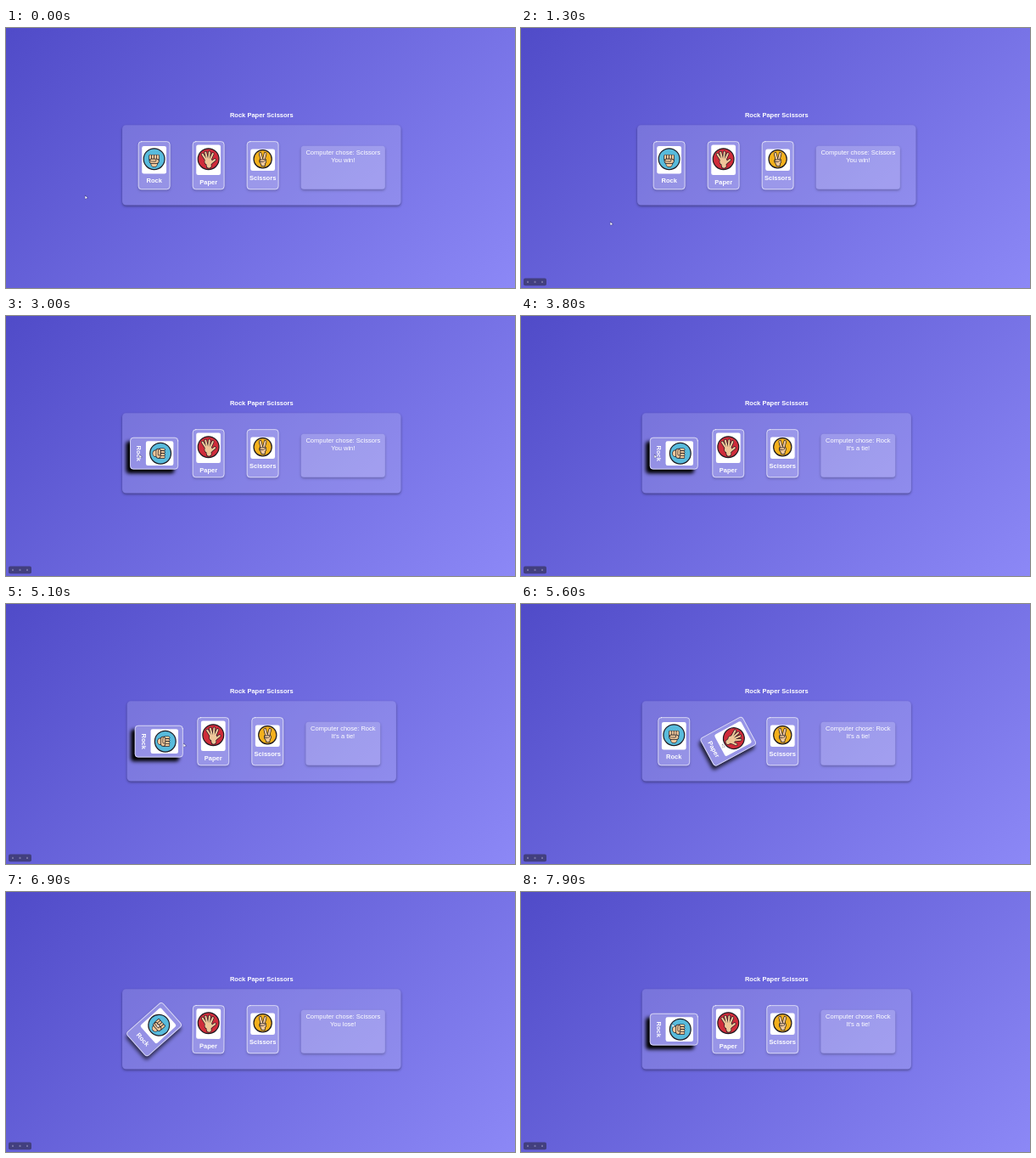
An HTML page with a canvas for the animation above (8000 ms loop, 600 by 306 pixels).

```html
<!DOCTYPE html>
<html lang="en">
<head>
<meta charset="utf-8">
<title>Rock Paper Scissors</title>
<style>
  html, body { margin: 0; width: 100%; height: 100%; overflow: hidden; background: #6d69de; }
  canvas { display: block; width: 100vw; height: 100vh; }
</style>
</head>
<body>
<canvas id="stage"></canvas>
<script>
const W = 600, H = 306, LOOP = 8000, TURN = 500, GLIDE = 400;
const canvas = document.getElementById('stage');
const ctx = canvas.getContext('2d');
const dpr = window.devicePixelRatio || 1;
canvas.width = W * dpr;
canvas.height = H * dpr;

const FONT = '7.53px "Liberation Sans", Arial, sans-serif';
const INK = '#1d1a22', SKIN = '#efc79a';
const CENTER = 301.3, PAD = 18.7, GAP = 26.2;
const CARD_W = 37.8, CARD_H = 57, CARD_Y = 161.7;

const cards = [
  { name: 'Rock', imgH: 32.5, color: '#58bbdc', hand: fist, hover: [[2035, 5120], [6745, LOOP + TURN]] },
  { name: 'Paper', imgH: 35.5, color: '#cf2c3a', hand: palm, hover: [[5400, 6450]] },
  { name: 'Scissors', imgH: 25.5, color: '#f3b01c', hand: victory, hover: [] }
];

// Each round: the player's and the computer's card by index
const rounds = [
  { at: 0, you: 0, computer: 2 },
  { at: 3400, you: 0, computer: 0 },
  { at: 6100, you: 1, computer: 2 },
  { at: 7300, you: 0, computer: 0 }
];
const verdicts = ["It's a tie!", 'You win!', 'You lose!'];

// Where the pointer comes to rest
const stops = [
  { at: 0, x: 94, y: 198 },
  { at: 400, x: 91, y: 220 },
  { at: 1000, x: 106, y: 229 },
  { at: 2300, x: 158, y: 164 },
  { at: 5100, x: 210, y: 165 },
  { at: 5500, x: 238, y: 166 },
  { at: 6900, x: 179, y: 156 }
];

const clamp = p => Math.min(1, Math.max(0, p));
const smooth = p => p * p * (3 - 2 * p);

// CSS "ease": solve the Bezier's x for its parameter, then take y
function ease(p) {
  if (p <= 0 || p >= 1) return clamp(p);
  const bez = (a, b, u) => 3 * a * u * (1 - u) ** 2 + 3 * b * u * u * (1 - u) + u ** 3;
  let lo = 0, hi = 1;
  for (let i = 0; i < 24; i++) {
    const mid = (lo + hi) / 2;
    if (bez(0.25, 0.25, mid) < p) lo = mid; else hi = mid;
  }
  return bez(0.1, 1, lo);
}

function turnOf(card, t) {
  return card.hover.reduce((sum, [enter, leave]) =>
    sum + ease((t - enter) / TURN) - ease((t - leave) / TURN), 0);
}

function cursorAt(t) {
  let { x, y } = stops[0];
  for (const stop of stops.slice(1)) {
    const k = smooth(clamp((t - stop.at) / GLIDE + 1));
    x += (stop.x - x) * k;
    y += (stop.y - y) * k;
  }
  return [x, y];
}

function fillBox(x, y, w, h, r, color) {
  ctx.beginPath();
  ctx.roundRect(x, y, w, h, r);
  ctx.fillStyle = color;
  ctx.fill();
}

// Soft shadow that stays outside its box
function shadow(x, y, w, h, r, dx, dy, blur, alpha) {
  ctx.save();
  ctx.beginPath();
  ctx.rect(x - 40, y - 40, w + 80, h + 80);
  ctx.roundRect(x, y, w, h, r);
  ctx.clip('evenodd');
  ctx.filter = `blur(${blur / 2 * dpr}px)`;
  fillBox(x + dx, y + dy, w, h, r, `rgba(0,0,0,${alpha})`);
  ctx.restore();
}

function glass(x, y, w, h, r, light, shade) {
  shadow(x, y, w, h, r, 0, 1.5, 3.6, shade);
  fillBox(x, y, w, h, r, `rgba(255,255,255,${light})`);
}

function text(str, x, y, weight = '') {
  ctx.font = `${weight} ${FONT}`;
  ctx.fillStyle = '#fff';
  ctx.fillText(str, x, y);
}

function line(x0, y0, x1, y1, width, color) {
  ctx.beginPath();
  ctx.moveTo(x0, y0);
  ctx.lineTo(x1, y1);
  ctx.lineWidth = width;
  ctx.strokeStyle = color;
  ctx.stroke();
}

// Round limbs with one shared outline
function limbs(...list) {
  for (const [grow, color] of [[1.3, INK], [0, SKIN]])
    for (const [x0, y0, x1, y1, w] of list) line(x0, y0, x1, y1, w + grow, color);
}

const finger = (x, y, angle, length, w) =>
  [x, y, x + Math.sin(angle) * length, y - Math.cos(angle) * length, w];

function fist() {
  limbs([0, 3, 0, 5.5, 7]);
  for (let i = 0; i < 4; i++) limbs(finger(2.9 * i - 4.35, 0.6, 0, 4.2, 2.5));
  limbs([-3, 2.6, 3, 2.6, 4.6]);
  limbs([-3.5, 1.4, 1, 1.5, 2.2]);
}

function palm() {
  const fingers = [0, 1, 2, 3].map(i =>
    finger(1.6 * i - 2.8, 1, 0.33 * i - 0.58, 9.6 - 1.2 * Math.abs(i - 1.5), 2.1));
  limbs(...fingers, finger(2.5, 5, 0.9, 6.4, 2.2), [-1, 3, 1, 3, 6.6], [0.2, 5, 0.6, 8, 5.2]);
}

function victory() {
  const fingers = [-1, 1].map(side => finger(1.1 * side, 1, 0.25 * side, 7.6, 2.2));
  limbs(...fingers, [-0.8, 2.6, 1, 2.6, 5.6], [0.2, 4, 0.4, 6.2, 4.4]);
  limbs([-2.4, 2.2, 1.4, 1.6, 1.8]);
}

function drawCard(card, x, t) {
  const k = turnOf(card, t), imgY = -6.5, discY = imgY - 1;
  ctx.save();
  ctx.translate(x, CARD_Y);
  ctx.rotate(k * Math.PI / 2);
  const rect = [-CARD_W / 2, -CARD_H / 2, CARD_W, CARD_H, 4];
  shadow(...rect, 4.7 * k, 1.6 + 3.1 * k, 2.8 + 1.9 * k, 0.2 + 0.8 * k);
  fillBox(...rect, 'rgba(255,255,255,0.18)');
  ctx.beginPath();
  ctx.roundRect(0.45 - CARD_W / 2, 0.45 - CARD_H / 2, CARD_W - 0.9, CARD_H - 0.9, 3.6);
  ctx.lineWidth = 0.94;
  ctx.strokeStyle = 'rgba(255,255,255,0.65)';
  ctx.stroke();

  fillBox(-14.4, imgY - card.imgH / 2, 28.8, card.imgH, 2.3, '#fff');
  text(card.name, 0, imgY + card.imgH / 2 + 10.8, 'bold');
  ctx.translate(0, discY);
  ctx.beginPath();
  ctx.arc(0, 0, Math.min(13, card.imgH * 0.44) - 0.6, 0, Math.PI * 2);
  ctx.fillStyle = card.color;
  ctx.fill();
  ctx.lineWidth = 1.2;
  ctx.strokeStyle = INK;
  ctx.stroke();
  card.hand();
  ctx.restore();
}

function drawBar(t) {
  ctx.save();
  ctx.globalAlpha = clamp((t - 100) / 200);
  fillBox(3, 294.6, 27, 8.6, 2, 'rgba(52,50,92,0.72)');
  for (let i = 0; i < 3; i++) fillBox(7 + 8.5 * i, 297.8, 2, 2.2, 0.6, 'rgba(170,168,205,0.5)');
  ctx.restore();
}

function drawCursor(t) {
  ctx.save();
  ctx.translate(...cursorAt(t));
  ctx.beginPath();
  ctx.moveTo(-0.6, -0.6);
  ctx.lineTo(-0.6, 3);
  ctx.lineTo(2, 2);
  ctx.closePath();
  ctx.lineWidth = 0.6;
  ctx.strokeStyle = 'rgba(25,25,50,0.7)';
  ctx.stroke();
  ctx.fillStyle = '#fff';
  ctx.fill();
  ctx.restore();
}

function draw(t) {
  ctx.setTransform(dpr, 0, 0, dpr, 0, 0);
  ctx.textAlign = 'center';
  ctx.lineCap = 'round';

  const reach = (W + H) / 4;
  const bg = ctx.createLinearGradient(W / 2 - reach, H / 2 - reach, W / 2 + reach, H / 2 + reach);
  bg.addColorStop(0, '#504bc8');
  bg.addColorStop(1, '#8c88f6');
  ctx.fillStyle = bg;
  ctx.fillRect(0, 0, W, H);

  const { you, computer } = rounds.filter(r => r.at <= t).pop();
  const message = 'Computer chose: ' + cards[computer].name;
  text('Rock Paper Scissors', CENTER, 104.6, 'bold');

  // The panel is as wide as its cards plus the message
  ctx.font = FONT;
  const boxW = ctx.measureText(message).width + 11.4;
  const step = CARD_W + GAP;
  const width = 2 * PAD + 3 * step + boxW;
  const left = CENTER - width / 2;
  const boxX = left + PAD + 3 * step;
  glass(left, 114.2, width, 94.4, 4.5, 0.145, 0.36);
  glass(boxX, 138.8, boxW, 51, 3.5, 0.18, 0.26);
  text(message, boxX + boxW / 2, 149.4);
  text(verdicts[(you - computer + 3) % 3], boxX + boxW / 2, 158);

  cards.forEach((card, i) => drawCard(card, left + PAD + CARD_W / 2 + i * step, t));
  drawBar(t);
  drawCursor(t);
}

const start = performance.now();
function tick() {
  draw((performance.now() - start) % LOOP);
  requestAnimationFrame(tick);
}
tick();
</script>
</body>
</html>
```
